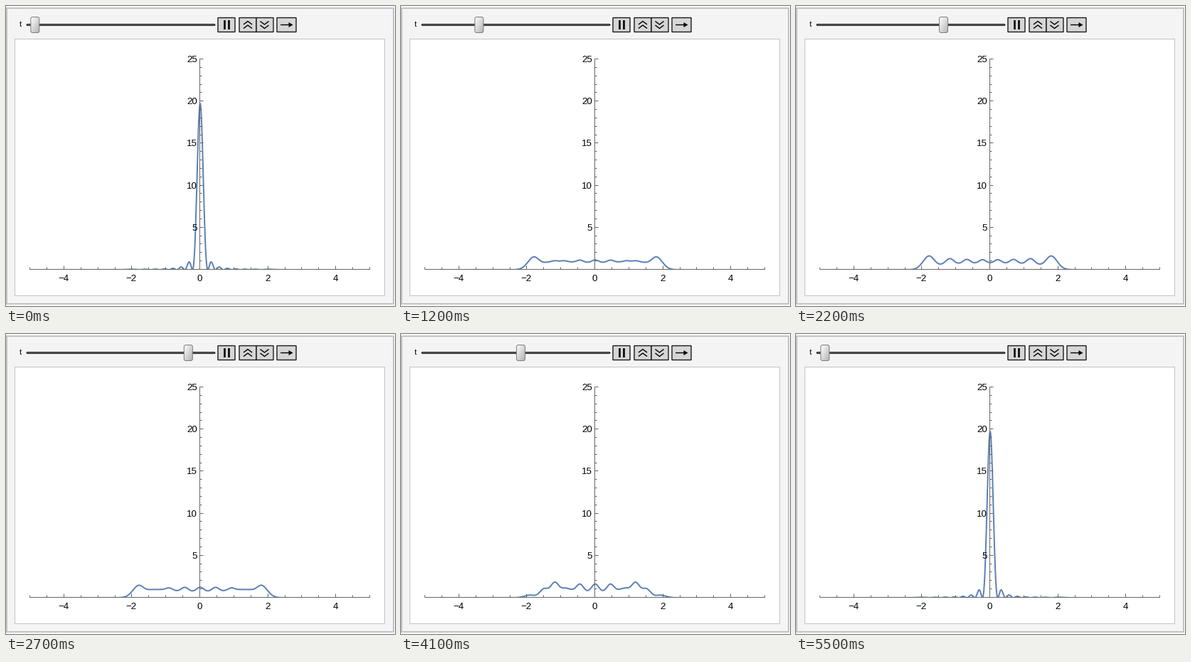
Write a matplotlib script that moves like this. It is 547 px wide and 422 px high and loops after 6000 ms.

```python
import numpy as np
import matplotlib.pyplot as plt
from matplotlib.animation import FuncAnimation
from matplotlib.patches import FancyBboxPatch, Polygon, Rectangle

W, H, DPI = 547, 422, 100
PX = 72 / DPI                      # points per pixel
X0, Y0 = 272.5, 370.5              # pixel centre where the axes cross
XU, YU = 47.8, 11.84               # pixels per unit
AXIS, CURVE, BORDER = "#666666", "#5e81b5", "#c3c3c3"

plt.rcParams["font.family"] = "Liberation Sans"
fig = plt.figure(figsize=(W / DPI, H / DPI), dpi=DPI, facecolor="white")
ax = fig.add_axes([0, 0, 1, 1])
ax.axis("off")


def fix_limits():
    ax.set_xlim(0, W)
    ax.set_ylim(H, 0)


def line(xs, ys, color="black", width=1, z=3, cap="butt", join="miter"):
    return ax.plot(xs, ys, color=color, lw=width * PX, zorder=z, snap=False,
                   solid_capstyle=cap, solid_joinstyle=join)[0]


def box(x, y, w, h, fill, edge, width=1, z=1):
    ax.add_patch(Rectangle((x, y), w, h, fc=fill, ec=edge, snap=False,
                           lw=width * PX, zorder=z, joinstyle="miter"))


def label(x, y, text, size=13.33, ha="center"):
    ax.text(x, y, text, size=size * PX, ha=ha, va="baseline", zorder=6)


def draw_axes():
    line([X0 - 5 * XU, X0 + 5 * XU], [Y0, Y0], AXIS, z=5)
    line([X0, X0], [Y0, Y0 - 25 * YU], AXIS, z=5)
    for i in range(-10, 11):
        x = np.floor(X0 + i / 2 * XU) + 0.5
        line([x, x], [Y0, Y0 - (5 if i % 4 == 0 else 3)], AXIS, z=5)
        if i % 4 == 0:
            label(x - 0.5, 387, str(i // 2).replace("-", "\u2212"))
    for v in range(1, 26):
        y = np.floor(Y0 - v * YU) + 0.5
        line([X0, X0 + (5 if v % 5 == 0 else 3)], [y, y], AXIS, z=5)
        if v % 5 == 0:
            label(269, y + 4.8, str(v), ha="right")


def draw_controls():
    label(20.8, 29, "t", 11)
    line([30, 293], [26.5, 26.5], "#1c1c1c", 3, cap="round")
    line([30, 293], [26.5, 26.5], "#777777", 1)
    for x, w in ((298, 24), (328, 24), (352, 24), (381, 27)):
        box(x, 16.5, w, 20, "#d6d6d6", "#1a1a1a", 1.4, 3)
    for x in (307.5, 313.5):
        line([x, x], [20, 33], width=2.6, z=4)
    for y in (26, 31.5):
        line([334, 340, 346], [y, y - 4.5, y], width=1.4, z=4)
    for y in (21.5, 27):
        line([357.5, 363.5, 369.5], [y, y + 4.5, y], width=1.4, z=4)
    line([386, 400], [26.5, 26.5], width=1.4, z=4)
    ax.add_patch(Polygon([(397.5, 23), (403.5, 26.5), (397.5, 30)],
                         fc="black", lw=0, zorder=4))


def oscillator_terms(x, top=14):
    """Products phi_n(0) phi_n(x) for the even oscillator states."""
    beta = 2 * np.pi
    pts = np.append(x, 0.0)
    prev, cur = np.zeros_like(pts), 2 ** 0.25 * np.exp(-beta * pts**2 / 2)
    terms = []
    for n in range(top + 1):
        if n % 2 == 0:
            terms.append(cur[-1] * cur[:-1])
        nxt = (np.sqrt(2 * beta / (n + 1)) * pts * cur
               - np.sqrt(n / (n + 1)) * prev)
        prev, cur = cur, nxt
    return np.array(terms)


fix_limits()
box(1, 3, 544, 416, "#f4f4f4", BORDER, 2)
box(12.5, 46.5, 520, 361, "white", BORDER, 1, 2)
draw_axes()
draw_controls()

# The curve is cut off at the lower edge of the horizontal axis.
BASE_X, BASE_Y = X0 + 0.5, Y0 + 0.5
xs = np.linspace(-5, 5, 2001)
terms = oscillator_terms(xs)
levels = 2 * np.arange(len(terms))
curve = line([], [], CURVE, 2, 4, join="round")
curve.set_clip_path(Rectangle((0, BASE_Y), W, -BASE_Y,
                              transform=ax.transData))

THUMB_W, THUMB_H, THUMB_Y = 12, 22, 15.5
thumb = FancyBboxPatch((0, THUMB_Y), THUMB_W, THUMB_H, fc="none", ec="#7d7d7d",
                       boxstyle="round,pad=0,rounding_size=2.5", snap=False,
                       lw=PX, zorder=8)
ax.add_patch(thumb)
ramp = np.linspace(0, 0.5, 22)
shade = ax.imshow(1 - 0.3 * (ramp[:, None] + ramp), cmap="gray", vmin=0,
                  vmax=1, aspect="auto", zorder=7, extent=(0, 1, 1, 0))
fix_limits()


def phase_at(step):
    return 0.0 if step == 0 else 0.0475 + 0.6475 * (step - 1)


def update(frame):
    # rest, sweep forward, sweep back, rest
    step = max(0, min(frame - 4, 25, 55 - frame))
    phase = phase_at(step)
    density = np.abs(np.exp(-1j * levels * phase) @ terms) ** 2
    curve.set_data(BASE_X + xs * XU, BASE_Y - density * YU)

    left = 40.8 + 15.08 * phase - THUMB_W / 2
    thumb.set_x(left)
    shade.set_extent((left, left + THUMB_W, THUMB_Y + THUMB_H, THUMB_Y))
    shade.set_clip_path(thumb)
    fix_limits()
    return curve, thumb, shade


anim = FuncAnimation(fig, update, frames=60, interval=100,
                     repeat=True, repeat_delay=0, blit=False)
plt.show()
```
